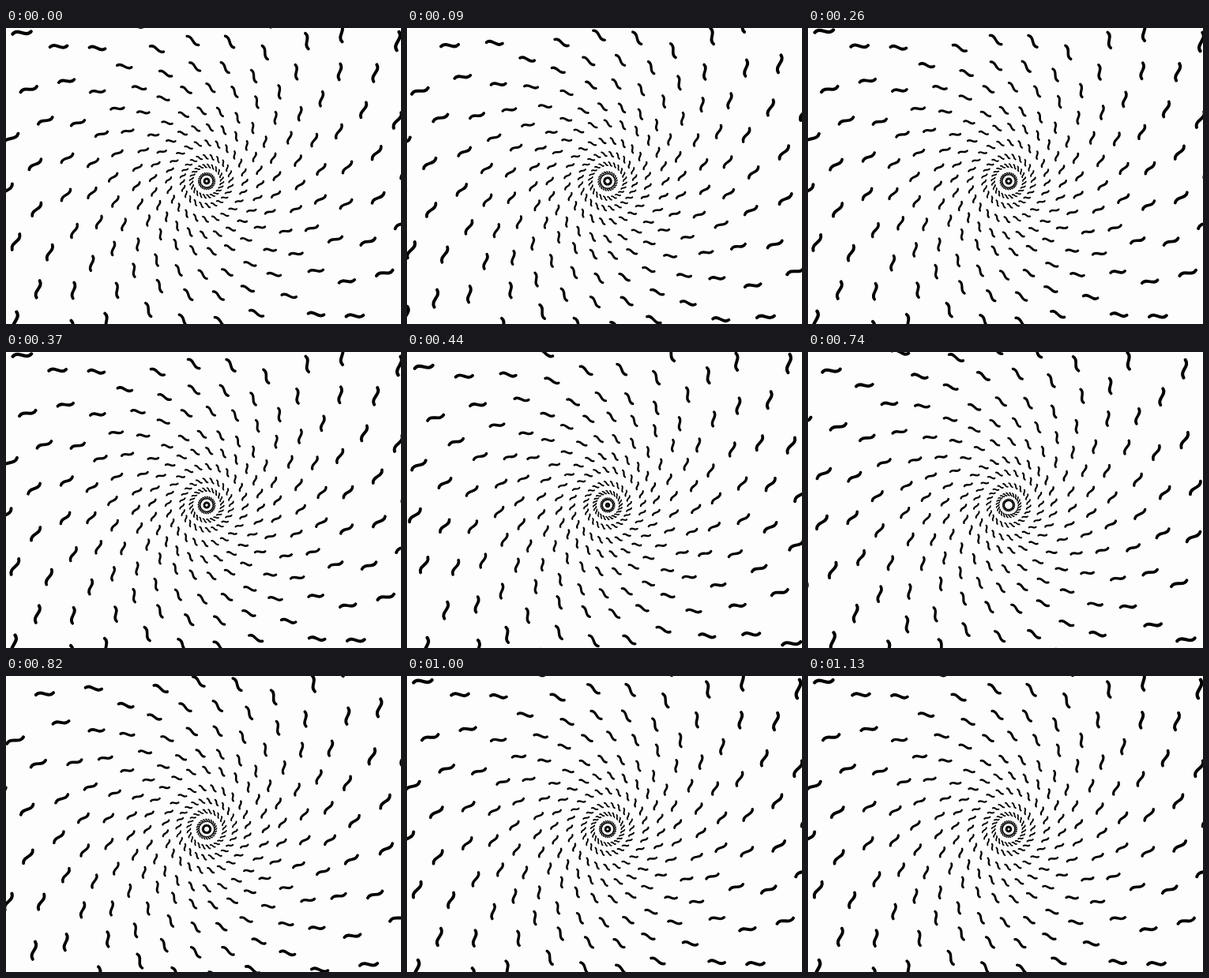
Write an HTML page with a canvas that moves like this. It is 500 px wide and 375 px high and loops after 1210 ms.

```html
<!DOCTYPE html>
<html>
<head>
<meta charset="utf-8">
<style>
  html, body { margin: 0; height: 100%; overflow: hidden; background: #fdfdfd; }
  canvas { display: block; }
</style>
</head>
<body>
<canvas id="stage" width="500" height="375"></canvas>
<script>
const ctx = document.getElementById('stage').getContext('2d');
const TAU = Math.PI * 2, DEG = Math.PI / 180;
const LOOP = 1210, PER_RING = 24, RINGS = 14;

// Outward travel in ring spacings, held from each start time on.
const steps = [[0, 0.34], [90, 0.55], [260, 1.37], [440, 2.11],
               [620, 2.9], [820, 3.62], [1000, 4.33]];

const tilde = new Path2D('M-1 .1C-.4 -.55 .4 .55 1 -.1');

function drawRing(v) {
  // Marks sway sideways as they travel outwards.
  const sway = Math.cos(TAU * (v - 12.25) / 1.6);
  const radius = 1.68 * (v - 0.06 * sway) ** 2;
  const offset = 6.4 + 0.65 * (v - 7.8) + 39 / v * sway;
  const size = 0.88 * v;
  ctx.lineWidth = (0.9 + 0.25 * v) / size;
  for (let i = 0; i < PER_RING; i++) {
    const angle = (offset + i * 360 / PER_RING) * DEG;
    ctx.save();
    ctx.translate(254 + radius * Math.cos(angle), 194 + radius * Math.sin(angle));
    ctx.rotate(angle - 41 * DEG);
    ctx.scale(size, size);
    ctx.stroke(tilde);
    ctx.restore();
  }
}

function draw() {
  const t = performance.now() % LOOP;
  const travel = steps.findLast(([start]) => t >= start)[1];
  ctx.fillStyle = '#fdfdfd';
  ctx.fillRect(0, 0, 500, 375);
  ctx.strokeStyle = '#000';
  ctx.lineCap = 'round';
  for (let k = 1; k <= RINGS; k++) drawRing(k + travel % 1);
  requestAnimationFrame(draw);
}
draw();
</script>
</body>
</html>
```
